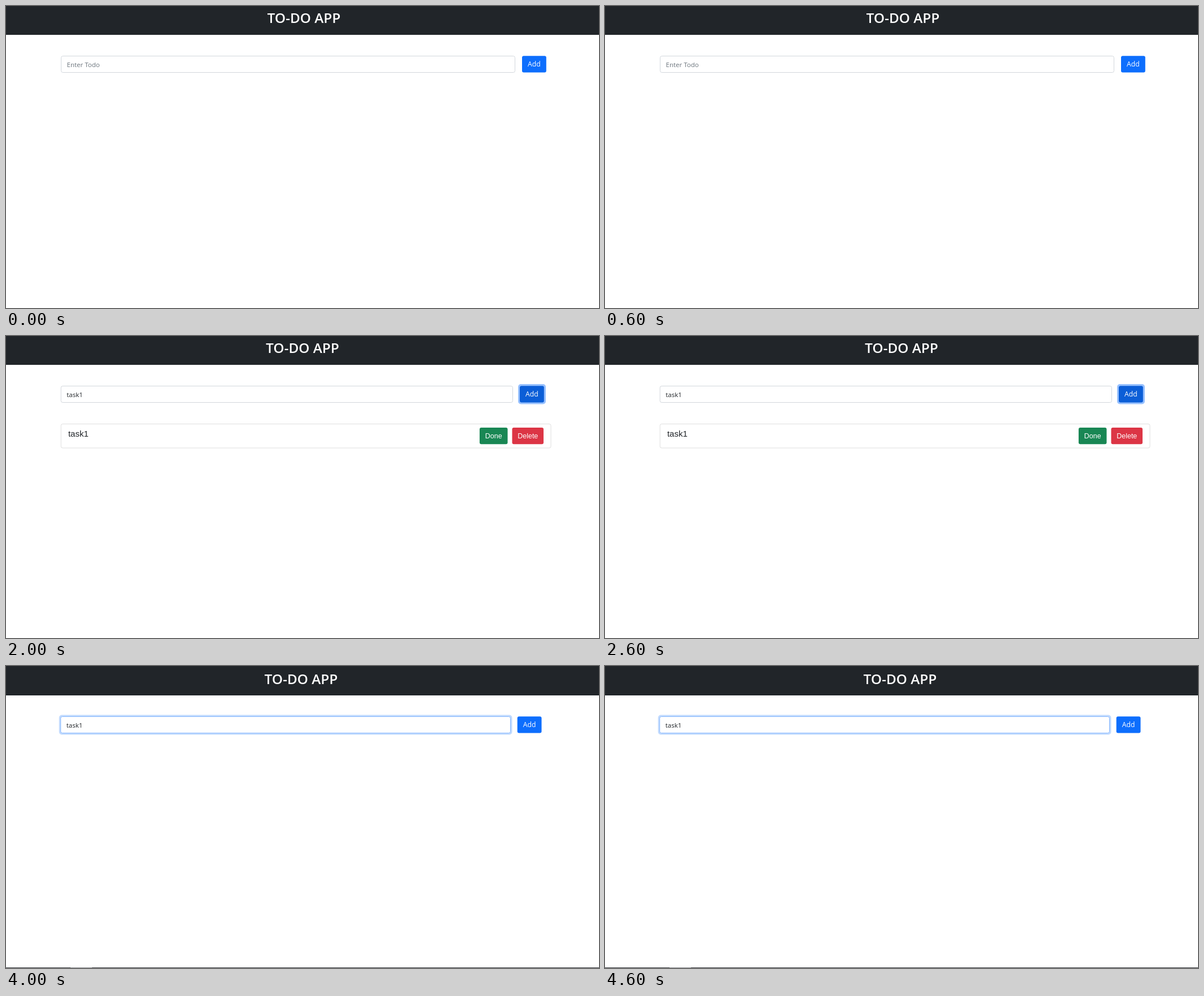
These frames come from a looping animation (1048 by 534 pixels, 5 s). An HTML page:

```html
<!DOCTYPE html>
<html lang="en">
<head>
<meta charset="utf-8">
<title>To-do app</title>
<style>
  html, body { margin: 0; width: 100%; height: 100%; overflow: hidden; background: #fff; }
  svg { display: block; }
  text { font: 11.5px "Open Sans", "Noto Sans", sans-serif; fill: #212529; }
  .title { font-size: 24.3px; font-weight: 600; fill: #fff; }
  .label { font-size: 12.2px; fill: #fff; }
  .arial { font-family: "Liberation Sans", sans-serif; font-size: 12.5px; }
  .task { font-size: 15px; }
  .done { text-decoration: line-through; }
  .hint { fill: #6c757d; }
</style>
</head>
<body>
<svg id="stage" width="1048" height="534" viewBox="0 0 1048 534"></svg>
<script>
const stage = document.getElementById("stage");
const SCENE_MS = 1000;

// top: vertical page offset; left/right: edges of the input; add: left edge of the Add button
const scenes = [
  { top: 0, title: 526.5, left: 97.5, right: 899.5, add: 912, hint: true },
  { top: 1, title: 523, left: 97, right: 894, add: 906, inputFocus: true },
  { top: 0, title: 524, left: 97.2, right: 895.5, add: 908, addFocus: true,
    item: { right: 963, done: 837, remove: 894.5 } },
  { top: 1, title: 521.5, left: 96.7, right: 891, add: 903.7, taskbar: true,
    item: { right: 958.3, remove: 890, finished: true } },
  { top: 1, title: 521.5, left: 96.7, right: 891.5, add: 903.7, taskbar: true, inputFocus: true }
];

const box = (x, y, w, h, fill, stroke = "none", r = 3) =>
  `<rect x="${x}" y="${y}" width="${w}" height="${h}" rx="${r}" fill="${fill}" stroke="${stroke}"/>`;

const text = (x, y, content, style = "", anchor = "start") =>
  `<text x="${x}" y="${y}" class="${style}" text-anchor="${anchor}">${content}</text>`;

const button = (x, y, w, label, fill, style = "label") =>
  box(x, y, w, 29.3, fill) + text(x + w / 2, y + 19, label, style, "middle");

function itemRow(item, left, top) {
  const y = 155 + top;
  const fill = item.finished ? "#aecdc5" : "#fff";
  const border = item.finished ? "#9cb9b2" : "#dfdfdf";
  return box(left, y + .5, item.right - left, 42.5, fill, border) +
    text(left + 12.7, y + 22.5, "task1", "arial task" + (item.finished ? " done" : "")) +
    (item.done ? button(item.done, y + 7, 49.5, "Done", "#198754", "label arial") : "") +
    button(item.remove, y + 7, 55.5, "Delete", "#dc3545", "label arial");
}

function draw(s) {
  const y = 88.5 + s.top;
  const width = s.right - s.left;
  let out = box(0, 0, 1048, 51 + s.top, "#212529", "none", 0);
  out += text(s.title, 30 + s.top * 1.5, "TO-DO APP", "title", "middle");

  if (s.inputFocus) out += box(s.left - 3, y - 3, width + 6, 35, "#c2dbfe", "none", 5);
  out += box(s.left, y, width, 29, "#fff", s.inputFocus ? "#86b7fe" : "#d2d7dc");
  out += text(s.left + 10, y + 19.3, s.hint ? "Enter Todo" : "task1", s.hint ? "hint" : "");

  if (s.addFocus) out += box(s.add - 3, y - 3.5, 49, 35.5, "#98c1fe", "none", 5);
  out += button(s.add, y - .2, 42.8, "Add", s.addFocus ? "#0b5ed7" : "#0d6efd");

  if (s.item) out += itemRow(s.item, s.left, s.top);
  if (s.taskbar) {
    out += box(0, 533, 1048, 1, "#35383b", "none", 0) + box(114, 533, 38, 1, "#85878a", "none", 0);
  }
  stage.innerHTML = out;
}

let shown = -1;
function tick() {
  const index = Math.floor(performance.now() / SCENE_MS) % scenes.length;
  if (index !== shown) draw(scenes[shown = index]);
  requestAnimationFrame(tick);
}
tick();
</script>
</body>
</html>
```
